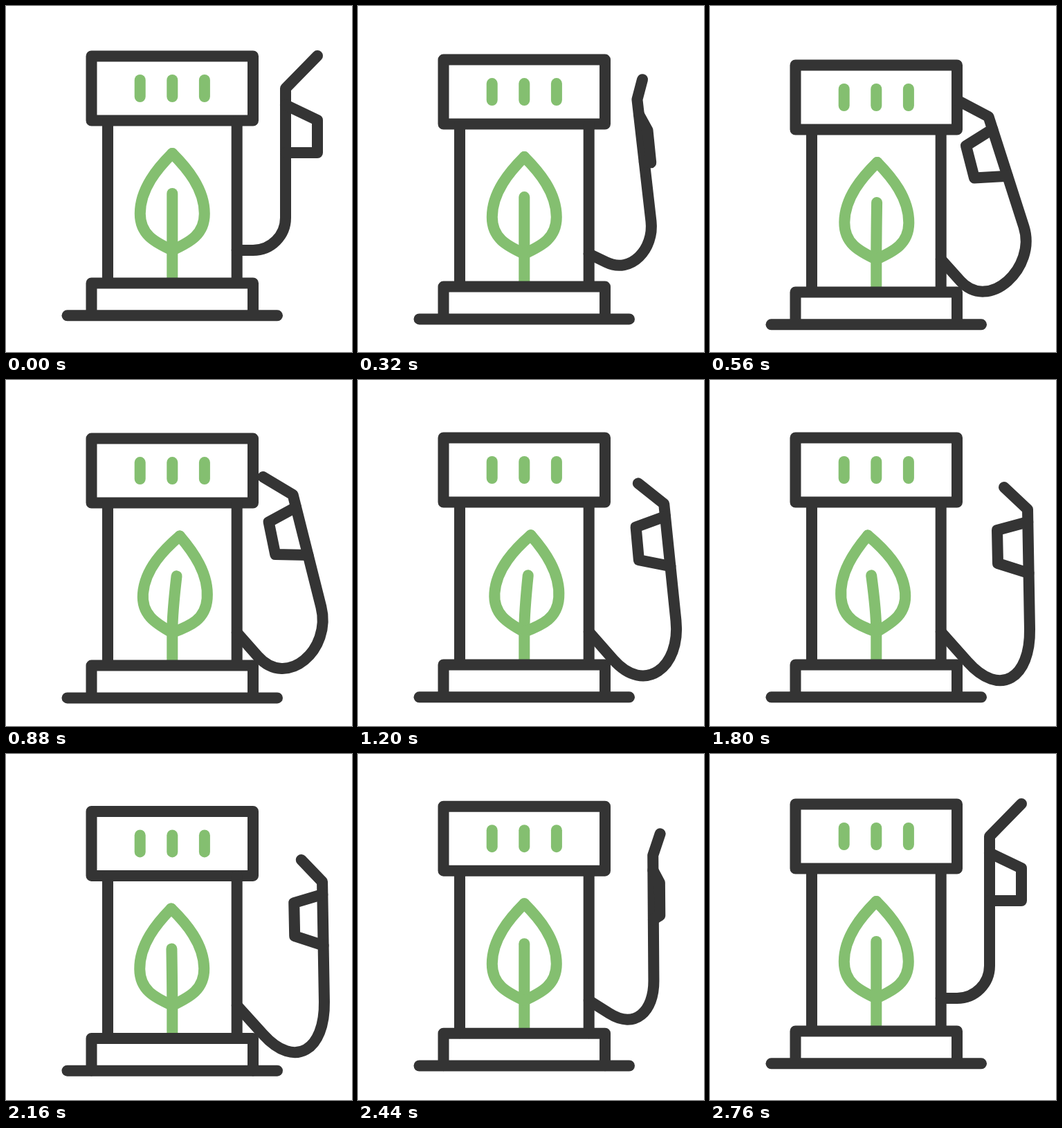
Write an HTML page with a canvas that moves like this. It is 500 px wide and 500 px high and loops after 3000 ms.

```html
<!DOCTYPE html>
<html lang="en">
<head>
<meta charset="utf-8">
<title>Green fuel pump</title>
<style>
  html, body { margin: 0; width: 100%; height: 100%; overflow: hidden; background: #fff; }
  canvas { display: block; width: 500px; height: 500px; }
</style>
</head>
<body>
<canvas id="stage" width="500" height="500"></canvas>
<script>
const ctx = document.getElementById('stage').getContext('2d');
const LOOP = 3000, STEP = 40;
const DARK = '#343434', GREEN = '#84bf70';
const LEFT = 123.5, RIGHT = 357, MID = 240.3, WALL = 333.7;
const SWAY = 0.0935;

// The hose runs tip - bend - end - curve - foot; grip holds the trigger's places between bend and end.
const parked = {
  tip: [450, 72], bend: [404, 119], end: [404, 306], foot: [357, 353],
  upper: [450, 165], lower: [450, 212], grip: [0.128, 0.497], slack: [26]
};
const docked = {
  tip: [357, 136], bend: [402.5, 160], end: [453.5, 319], foot: [361.5, 397],
  upper: [370, 202], lower: [382, 248.5], grip: [0.113, 0.54], slack: [62]
};
const hanging = {
  tip: [425, 155], bend: [459, 187], end: [462, 360], foot: [372, 407],
  upper: [415, 217], lower: [416, 265], grip: [0.104, 0.532], slack: [71]
};

const lerp = (a, b, p) => a.map((v, i) => v + (b[i] - v) * p);

function mix(from, to, p) {
  const pose = {};
  for (const part in from) pose[part] = lerp(from[part], to[part], p);
  return pose;
}

// Eased progress from 0 to 1 between two times.
function ease(t, from, to) {
  const p = Math.min(1, Math.max(0, (t - from) / (to - from)));
  return p * p * (3 - 2 * p);
}

function line(...points) {
  ctx.beginPath();
  for (const point of points) ctx.lineTo(...point);
  ctx.stroke();
}

function drawLeaf(angle) {
  const root = 352, stemTop = 81;
  ctx.strokeStyle = GREEN;
  for (const side of [-1, 0, 1]) {
    const x = MID + side * 46.6;
    line([x, 107], [x, 131]);
  }

  ctx.beginPath();
  ctx.moveTo(MID, 396);
  ctx.lineTo(MID, root);
  ctx.quadraticCurveTo(MID, 325, MID + stemTop * Math.sin(angle), root - stemTop * Math.cos(angle));
  ctx.stroke();

  ctx.save();
  ctx.translate(MID, root);
  ctx.rotate(angle);
  for (const side of [-1, 1]) {
    ctx.beginPath();
    ctx.moveTo(0, -139);
    ctx.bezierCurveTo(side * 21, -118, side * 46.5, -88, side * 46.5, -52);
    ctx.bezierCurveTo(side * 46.5, -22, side * 26, -11, 0, 1);
    ctx.stroke();
  }
  ctx.restore();
}

function drawPump() {
  ctx.strokeStyle = DARK;
  ctx.strokeRect(LEFT, 72.5, RIGHT - LEFT, 93);
  for (const x of [147, WALL]) line([x, 166], [x, 400]);
  line([LEFT, 447], [LEFT, 400.5], [RIGHT, 400.5], [RIGHT, 447]);
  line([88.5, 447.3], [392, 447.3]);
}

// The point at a given distance past b on the line from a to b.
function extend(a, b, distance) {
  return lerp(a, b, 1 + distance / Math.hypot(b[0] - a[0], b[1] - a[1]));
}

function drawHose(pose, drop, turn) {
  const { tip, bend, end, foot, upper, lower, grip, slack } = pose;
  const outlet = [WALL, 353 + drop];
  ctx.strokeStyle = DARK;
  ctx.beginPath();
  ctx.moveTo(...lerp(tip, bend, 0.25 * turn)); // the spout looks shorter while it turns
  ctx.lineTo(...bend);
  ctx.lineTo(...end);
  ctx.bezierCurveTo(...extend(bend, end, slack[0]), ...extend(outlet, foot, slack[0]), ...foot);
  ctx.lineTo(...outlet);
  ctx.stroke();
  line(lerp(bend, end, grip[0]), upper, lower, lerp(bend, end, grip[1]));
}

function draw(now) {
  const t = Math.floor((now % LOOP) / STEP) * STEP;

  const dock = ease(t, 140, 560), release = ease(t, 600, 1540), park = ease(t, 2090, 2710);
  const pose = mix(mix(mix(parked, docked, dock), hanging, release), parked, park);
  const turn = Math.sin(Math.PI * dock) + Math.sin(Math.PI * park);
  const drop = 13 * dock - 2 * ease(t, 600, 1200) - 11 * ease(t, 2080, 2640);
  const angle = SWAY * (ease(t, 440, 1040) - 2 * ease(t, 1040, 1720) + ease(t, 1720, 2280));

  ctx.fillStyle = '#fff';
  ctx.fillRect(0, 0, 500, 500);
  ctx.lineWidth = 16;
  ctx.lineCap = ctx.lineJoin = 'round';
  ctx.save();
  ctx.translate(0, drop);
  drawLeaf(angle);
  drawPump();
  ctx.restore();
  drawHose(pose, drop, turn);
}

let start;
function tick(now) {
  start ??= now;
  draw(now - start);
  requestAnimationFrame(tick);
}
requestAnimationFrame(tick);
</script>
</body>
</html>
```
